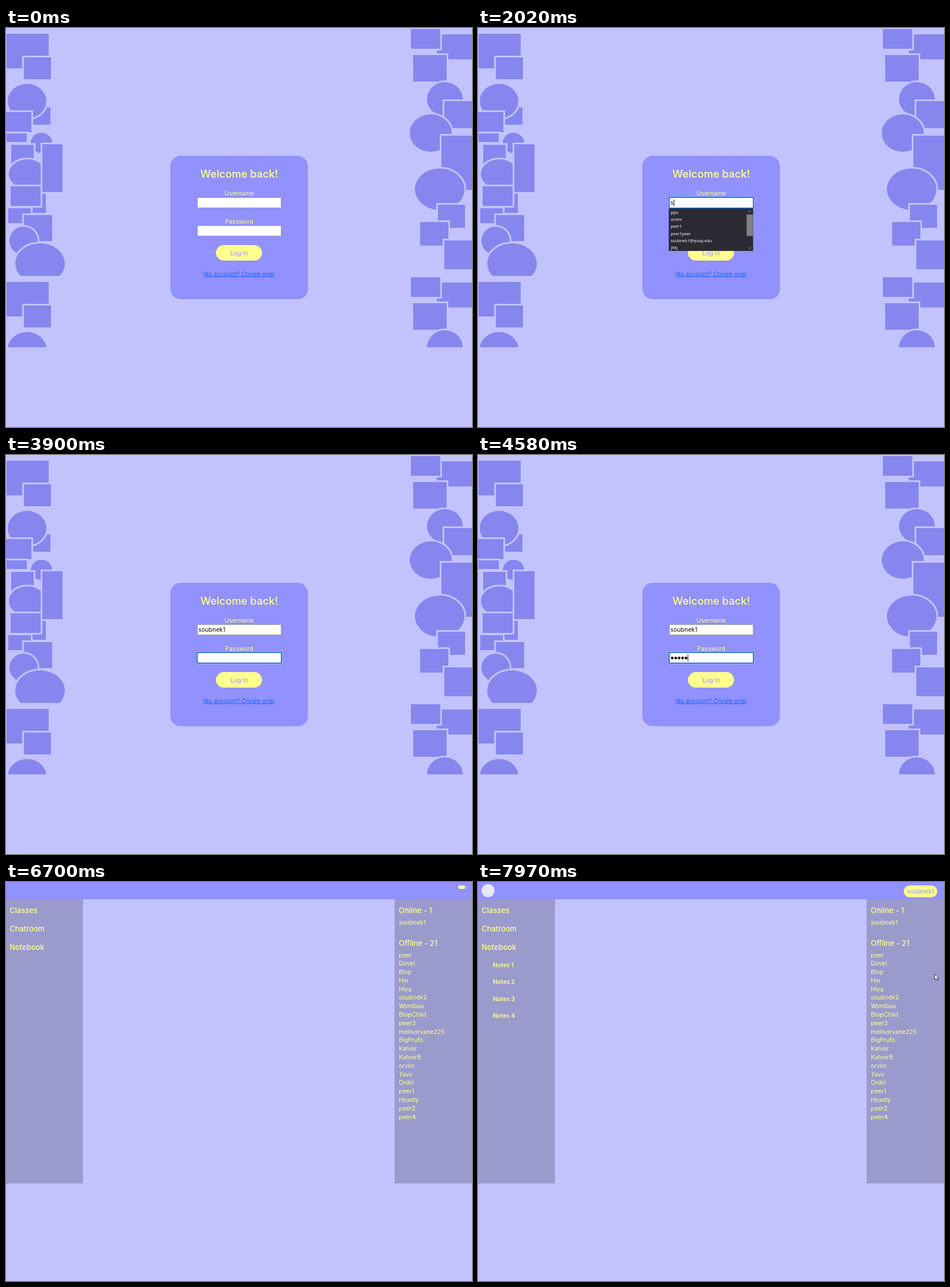
These frames come from a looping animation (808 px wide and 693 px high, 8000 ms). An HTML page:

```html
<!DOCTYPE html>
<html lang="en">
<head>
<meta charset="utf-8">
<title>Log in</title>
<style>
  html, body { margin: 0; width: 100%; height: 100%; overflow: hidden; background: #c2c2ff; }
  svg { display: block; width: 808px; height: 693px; }
  text { font-family: Inter, sans-serif; font-size: 10.5px; fill: #ffff8f; white-space: pre; }
  .mid { text-anchor: middle; }
  .title { font-size: 18.3px; font-weight: 500; }
  .head { font-size: 12.9px; font-weight: 500; }
  .note { font-size: 10.2px; font-weight: 600; }
  .typed { fill: #111; }
  .row { font: 7.1px "Noto Sans", sans-serif; fill: #fbfbfe; }
</style>
</head>
<body>
<svg id="stage" viewBox="0 0 808 693" xmlns="http://www.w3.org/2000/svg">
  <defs><clipPath id="fold"><rect width="808" height="554.5"/></clipPath></defs>
  <rect width="808" height="693" fill="#c2c2ff"/>
  <g id="login">
    <g id="decor" clip-path="url(#fold)"></g>
    <rect x="285" y="222" width="238.5" height="249" rx="18" fill="#9191ff"/>
    <text class="mid title" x="404.3" y="260.3">Welcome back!</text>
    <text class="mid" x="404.3" y="290.5">Username</text>
    <text class="mid" x="404.3" y="339.5">Password</text>
    <g id="fields"></g>
    <rect x="364" y="377" width="80" height="27" rx="13.5" fill="#ffff8f"/>
    <text class="mid" x="404.3" y="394.5" style="fill:#9191ff">Log In</text>
    <text class="mid" x="404.3" y="430.5" style="fill:#1a66ff;text-decoration:underline">No account? Create one!</text>
    <text id="name" class="typed" x="333.5" y="307"></text>
    <g id="dots"></g>
    <rect id="caret" width="1" height="12" fill="#111"/>
    <g id="list"></g>
  </g>
  <g id="home">
    <rect width="808" height="30" fill="#9191ff"/>
    <rect y="30" width="133.5" height="493.5" fill="#9a9acc"/>
    <rect x="673.8" y="30" width="134.2" height="493.5" fill="#9a9acc"/>
    <rect id="pill" y="6" fill="#ffff8f"/>
    <g id="late">
      <circle cx="17.5" cy="15" r="11.3" fill="#e6e6ff"/>
      <text class="mid" x="767.3" y="20" style="fill:#9191ff">soubnek1</text>
    </g>
  </g>
  <path id="arrow" d="M.5.5V10.6L2.9 8.4 4.5 11.7 6 11 4.5 7.8H7.6Z" fill="#fff" stroke="#111" stroke-width=".8"/>
</svg>
<script>
const $ = id => document.getElementById(id);
const LOOP = 8000, NAME = 'soubnek1';

function add(parent, tag, attrs, text) {
  const el = document.createElementNS('http://www.w3.org/2000/svg', tag);
  for (const key in attrs) el.setAttribute(key, attrs[key]);
  if (text) el.textContent = text;
  return parent.appendChild(el);
}
const set = (el, attrs) => { for (const key in attrs) el.setAttribute(key, attrs[key]); };
const show = (el, on) => el.setAttribute('visibility', on ? 'visible' : 'hidden');

// Overlapping shapes: kind, left, top, right, bottom
const LEFT = [
  ['r', 1, 10, 74, 70], ['r', 31, 51, 78, 89], ['r', 40, 138, 77, 168],
  ['e', 3, 97, 70, 157], ['r', 0, 146, 44, 181], ['r', 1, 183, 36, 198],
  ['e', 43, 182, 80, 217], ['r', 9, 203, 48, 240], ['e', 5, 228, 69, 279],
  ['r', 63, 202, 98, 285], ['r', 40, 288, 69, 321], ['r', 8, 275, 60, 309],
  ['r', 4, 313, 43, 339], ['r', 31, 325, 80, 370], ['e', 6, 345, 55, 394],
  ['e', 16, 374, 102, 444]
];
const RIGHT = [
  ['r', 747, 11, 812, 54.5], ['r', 702, 2, 753, 36], ['r', 706, 47, 764, 93],
  ['e', 730, 94, 792, 153], ['r', 760, 127, 812, 174], ['e', 700, 150, 773, 215],
  ['r', 755, 187, 812, 281], ['e', 709, 244, 795, 316], ['r', 749, 307, 796, 347],
  ['r', 718, 337, 767, 378], ['r', 760, 369, 812, 419]
];

function buildDecor() {
  const clip = add(document.querySelector('defs'), 'clipPath', { id: 'tile' });
  add(clip, 'rect', { width: 808, height: 430.5 });
  for (const dy of [0, 431]) {
    const g = add($('decor'), 'g', { transform: `translate(0 ${dy})`, 'clip-path': 'url(#tile)' });
    for (const [kind, l, t, r, b] of [...LEFT, ...RIGHT]) {
      const paint = { fill: '#8686ee', stroke: '#c2c2ff', 'stroke-width': 6, 'paint-order': 'stroke' };
      if (kind === 'r') add(g, 'rect', { x: l, y: t, width: r - l, height: b - t, ...paint });
      else add(g, 'ellipse', { cx: (l + r) / 2, cy: (t + b) / 2, rx: (r - l) / 2, ry: (b - t) / 2, ...paint });
    }
  }
}

function buildField(y) {
  const box = add($('fields'), 'rect', { x: 331.9, y, width: 145.2, height: 18, fill: '#fff', stroke: '#8f8f9d', 'stroke-width': .9 });
  const ring = add($('fields'), 'g', {});
  add(ring, 'rect', { x: 330.1, y: y - 1.7, width: 148.8, height: 21.4, rx: 1.5, fill: 'none', stroke: '#a9c4ff', 'stroke-width': 1 });
  add(ring, 'rect', { x: 331.4, y: y - .4, width: 146.2, height: 18.8, rx: .8, fill: 'none', stroke: '#0a5fe0', 'stroke-width': 1.5 });
  return { box, ring };
}

function buildList(rows, height) {
  const g = add($('list'), 'g', {});
  add(g, 'rect', { x: 331, y: 313.7, width: 145.8, height, fill: '#2b2a33', stroke: '#1c1b22', 'stroke-opacity': .5, 'stroke-width': .8 });
  rows.forEach((row, i) => add(g, 'text', { class: 'row', x: 334.3, y: 322.5 + i * 12.35 }, row));
  return g;
}

buildDecor();
const nameField = buildField(294.4), passField = buildField(343.2);
const MAIL = NAME + '@quop.edu';
const fullList = buildList(['ppo', 'orvim', 'peer1', 'peer1peer', MAIL, 'jhkj'], 73.3);
const shortList = buildList([MAIL], 12);
add(fullList, 'rect', { x: 465.7, y: 323.8, width: 11, height: 37.6, fill: '#7f7f85' });
add(fullList, 'path', { d: 'M468.6 319.6l2.4-2.4 2.4 2.4M468.6 380.8l2.4 2.4 2.4-2.4', fill: 'none', stroke: '#9a9aa0', 'stroke-width': 1 });

const dots = Array.from({ length: 11 }, (_, i) =>
  add($('dots'), 'circle', { cx: 336.8 + i * 5.97, cy: 352.6, r: 2.35, fill: '#111' }));

const say = (cls, x, y, text) => add($('home'), 'text', { class: cls, x, y }, text);
['Classes', 'Chatroom', 'Notebook'].forEach((s, i) => say('head', 6.3, 54.4 + i * 32, s));
say('head', 681, 54.4, 'Online - 1');
say('head', 681, 111.2, 'Offline - 21');
say('', 681, 73.7, NAME);
['peer', 'Dovel', 'Blop', 'Hm', 'Hiya', 'soubnek2', 'Wombus', 'BlopChild', 'peer3', 'melisorvane225',
 'BigPrufo', 'Kalvor', 'KalvorB', 'orvim', 'Tavo', 'Ordin', 'peer1', 'Howdy', 'peer2', 'peer4']
  .forEach((s, i) => say('', 681, 130.5 + i * 14.79, s));
for (let i = 0; i < 4; i++)
  add($('late'), 'text', { class: 'note', x: 26, y: 148.2 + i * 29.2 }, 'Notes ' + (i + 1));

// Key press times
const NAME_KEYS = [1950, 2090, 2360, 2430, 2560, 2630, 2770, 3050];
const PASS_KEYS = [3970, 4100, 4320, 4450, 4580, 4710, 4840, 5500, 5830, 5970, 6300];
const CARET_OFF = [[1430, 1950], [3050, 3440], [3900, 3970], [5040, 5500]];
const pressed = (keys, t) => keys.filter(k => t >= k).length;

// Pointer paths: time, x, y
const PATHS = [
  { from: 330, to: 1950, tick: 69.1, pts: [[330, 584, 587], [676, 424, 306], [814, 422, 304], [1090, 568, 274], [1160, 607, 263]] },
  { from: 7560, to: LOOP, tick: 68.3, pts: [[7560, 597, 316], [7765, 752, 216], [7901, 800, 172], [7969, 791.5, 159.5]] }
];

function pointer(t) {
  const path = PATHS.find(p => t >= p.from && t < p.to);
  if (!path) return null;
  const at = path.from + Math.floor((t - path.from) / path.tick + .01) * path.tick;
  const { pts } = path, next = pts.findIndex(p => p[0] > at);
  if (next < 0) return pts[pts.length - 1].slice(1);
  const a = pts[next - 1], b = pts[next], k = (at - a[0]) / (b[0] - a[0]);
  return [a[1] + (b[1] - a[1]) * k, a[2] + (b[2] - a[2]) * k];
}

function render(t) {
  const home = t >= 6700, onName = t >= 745 && t < 3440, onPass = t >= 3440 && !home;
  set($('login'), { display: home ? 'none' : 'inline' });
  set($('home'), { display: home ? 'inline' : 'none' });

  show(nameField.ring, onName);
  show(passField.ring, onPass);
  $('name').textContent = NAME.slice(0, pressed(NAME_KEYS, t));
  const count = pressed(PASS_KEYS, t);
  dots.forEach((dot, i) => show(dot, i < count));
  show(fullList, !home && t >= 2020 && t < 2090);
  show(shortList, !home && t >= 2090 && t < 3440);

  show($('caret'), (onName || onPass) && !CARET_OFF.some(([a, b]) => t >= a && t < b));
  if (onName) set($('caret'), { x: 333.8 + $('name').getComputedTextLength(), y: 297.8 });
  if (onPass) set($('caret'), { x: 333.8 + count * 5.95, y: 346.3 });

  const open = t >= 6770;
  set($('pill'), open ? { x: 738.3, width: 58, height: 20.6, rx: 10.3 } : { x: 784, width: 12.4, height: 6, rx: 3 });
  set($('late'), { display: open ? 'inline' : 'none' });

  const pos = pointer(t);
  show($('arrow'), pos);
  if (pos) set($('arrow'), { transform: `translate(${pos[0]} ${pos[1]})` });
}

const start = performance.now();
function frame(now) {
  render(Math.max(0, now - start) % LOOP);
  requestAnimationFrame(frame);
}
render(0);
requestAnimationFrame(frame);
</script>
</body>
</html>
```
